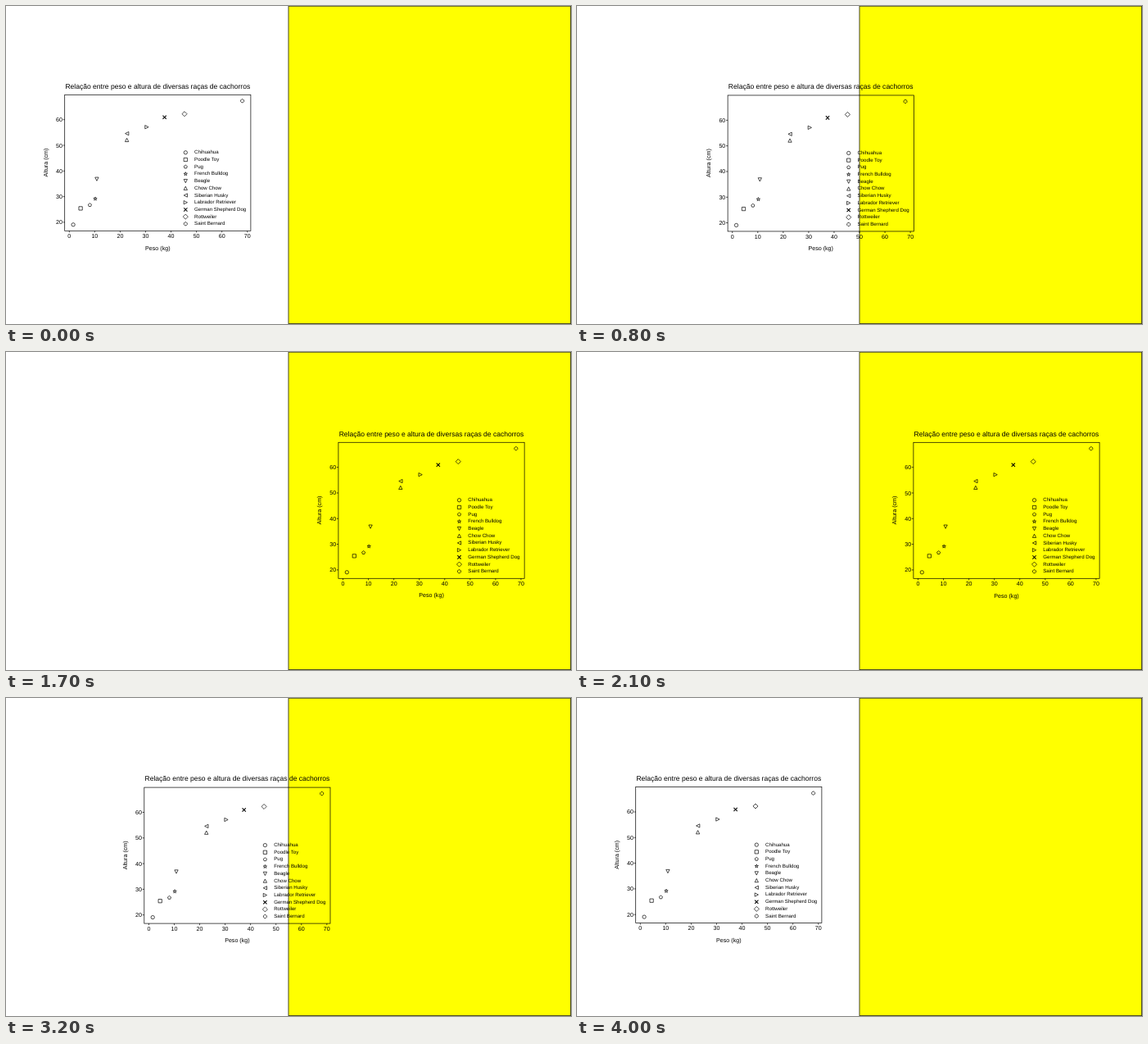
These frames come from a looping animation (690 by 388 pixels, 4.1 s). An HTML page:

```html
<!DOCTYPE html>
<html lang="pt">
<head>
<meta charset="utf-8">
<title>Peso e altura</title>
<style>
html, body { margin: 0; width: 100%; height: 100%; overflow: hidden; background: #fff; }
svg { display: block; width: 690px; height: 388px; }
text { font-family: "Liberation Sans", Arial, sans-serif; text-rendering: geometricPrecision; fill: #000; }
.line { fill: none; stroke: #000; stroke-width: .7; }
</style>
</head>
<body>
<svg viewBox="0 0 690 388">
  <rect x="345" y=".2" width="344.6" height="387.4" fill="#ff0" stroke="#33331a" stroke-width=".9"/>
  <g id="plot"></g>
</svg>
<script>
const NS = "http://www.w3.org/2000/svg";
const plot = document.getElementById("plot");

function add(tag, attrs, content) {
  const el = document.createElementNS(NS, tag);
  for (const key in attrs) el.setAttribute(key, attrs[key]);
  if (content !== undefined) el.textContent = content;
  plot.appendChild(el);
}
function label(content, x, y, size, anchor = "middle", extra = {}) {
  add("text", { x, y, "font-size": size, "text-anchor": anchor, ...extra }, content);
}
const stroke = (d, extra = {}) => add("path", { d, class: "line", ...extra });

// Marker outlines, centred on the origin
const R = 2.15;
const closed = pts => "M" + pts.map(p => p.map(v => v.toFixed(2)).join(" ")).join("L") + "Z";
function ring(n, radius = () => R, turn = 0) {
  return closed(Array.from({ length: n }, (_, i) => {
    const a = (i + turn) * 2 * Math.PI / n - Math.PI / 2;
    return [radius(i) * Math.cos(a), radius(i) * Math.sin(a)];
  }));
}
const shapes = {
  circle: `M${-R} 0A${R} ${R} 0 1 1 ${R} 0A${R} ${R} 0 1 1 ${-R} 0Z`,
  square: ring(4, () => R * Math.SQRT2, .5),
  pentagon: ring(5),
  star: ring(10, i => i % 2 ? R * .382 : R * 1.05),
  down: closed([[0, R], [-R, -R], [R, -R]]),
  up: closed([[0, -R], [-R, R], [R, R]]),
  left: closed([[-R, 0], [R, -R], [R, R]]),
  right: closed([[R, 0], [-R, -R], [-R, R]]),
  cross: `M${-R} ${-R}L${R} ${R}M${-R} ${R}L${R} ${-R}`,
  diamond: ring(4, () => R * Math.SQRT2),
  octagon: ring(8, () => R, .5)
};
function marker(shape, x, y) {
  stroke(shapes[shape], {
    transform: `translate(${x} ${y})`,
    ...(shape === "cross" && { style: "stroke-width:1.05" })
  });
}

const dogs = [
  ["Chihuahua", "circle", 82.1, 266.8],
  ["Poodle Toy", "square", 91.1, 246.9],
  ["Pug", "pentagon", 102.4, 242.8],
  ["French Bulldog", "star", 109, 235.2],
  ["Beagle", "down", 110.9, 211.2],
  ["Chow Chow", "up", 147.6, 163.4],
  ["Siberian Husky", "left", 147.7, 155.6],
  ["Labrador Retriever", "right", 171.9, 147.7],
  ["German Shepherd Dog", "cross", 193.6, 135.7],
  ["Rottweiler", "diamond", 218, 131.7],
  ["Saint Bernard", "octagon", 288.6, 115.8]
];

function drawPlot() {
  const left = 71.7, top = 108.3, bottom = 274.3;
  add("rect", { x: left, y: top, width: 227.2, height: bottom - top, class: "line" });
  for (let i = 0; i <= 7; i++) {
    const x = 77.3 + i * 31.06;
    stroke(`M${x} ${bottom}v2.1`);
    label(i * 10, x, 283.2, 7.1);
  }
  for (let i = 0; i < 5; i++) {
    const y = 263.9 - i * 31.3;
    stroke(`M${left} ${y}h-2.1`);
    label(20 + i * 10, 68.9, y + 2.5, 7.1, "end");
  }
  label("Relação entre peso e altura de diversas raças de cachorros", 185.3, 100.7, 8.54);
  label("Peso (kg)", 185.3, 297.5, 7.13);
  label("Altura (cm)", 0, 0, 7.13, "middle", { transform: "translate(50.9 191) rotate(-90)" });
  dogs.forEach(([name, shape, x, y], i) => {
    const row = 178.8 + i * 8.7;
    marker(shape, x, y);
    marker(shape, 219.3, row);
    label(name, 230.1, row + 1.5, 6.12, "start");
  });
}

// Constant acceleration, steady run, constant braking
const LOOP = 4100, STEP = 100, TRIP = 1740, RAMP = .4;
function glide(u) {
  u = Math.min(1, Math.max(0, u));
  const speed = 1 / (1 - RAMP);
  if (u < RAMP) return speed * u * u / (2 * RAMP);
  if (u > 1 - RAMP) return 1 - speed * (1 - u) ** 2 / (2 * RAMP);
  return speed * (u - RAMP / 2);
}

function render(ms) {
  const t = Math.floor((ms % LOOP) / STEP) * STEP;
  const out = glide((t - 106) / TRIP);
  const back = glide((t - 2105) / TRIP);
  const x = 339.2 * (out - back);
  const y = 2 * out - 1.7 * back;
  plot.setAttribute("transform", `translate(${x.toFixed(2)} ${y.toFixed(2)})`);
}

drawPlot();
const start = performance.now();
function tick() {
  render(performance.now() - start);
  requestAnimationFrame(tick);
}
tick();
</script>
</body>
</html>
```
